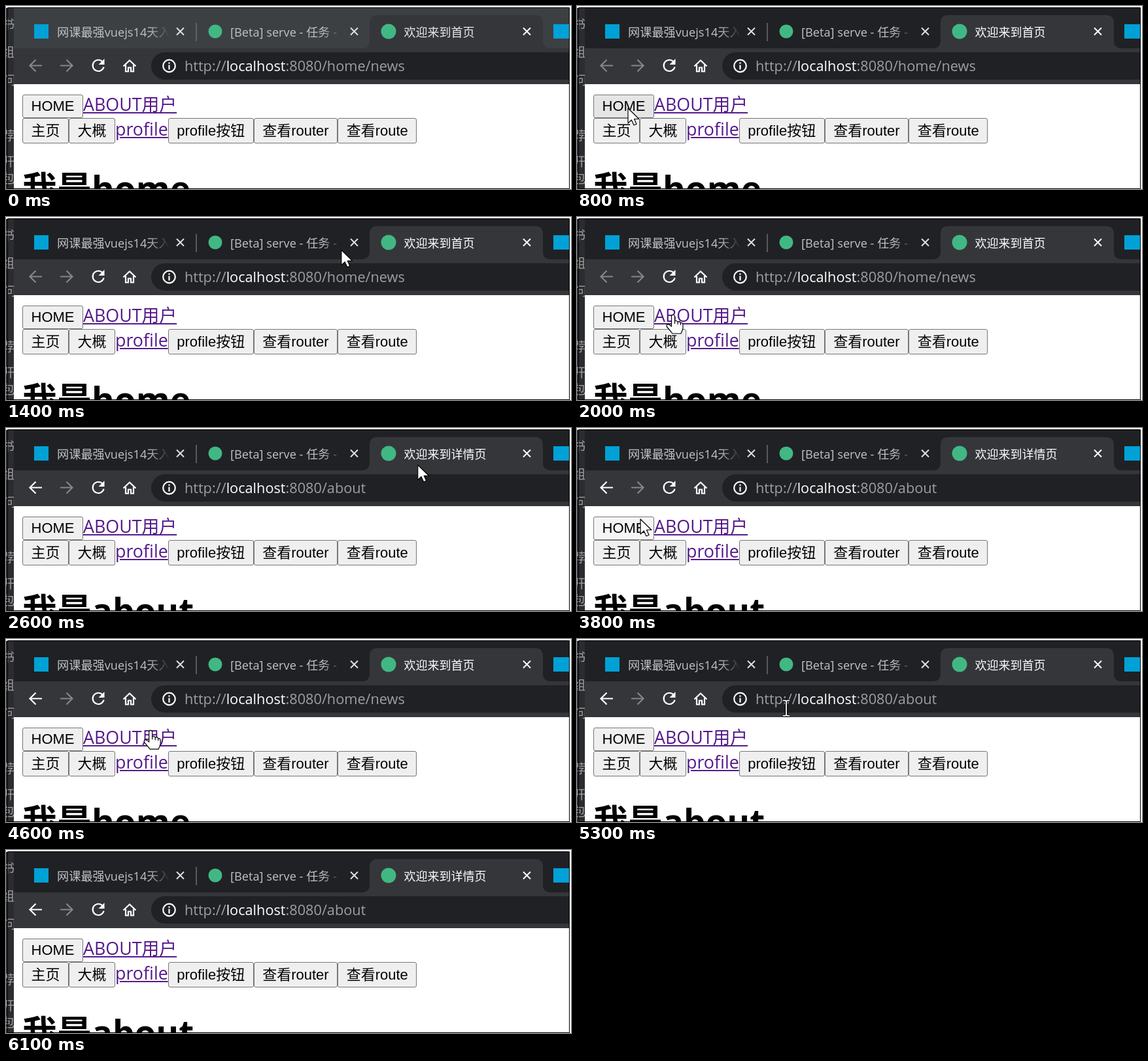
An HTML page for the animation above (6300 ms loop, 864 px wide and 281 px high).

```html
<!DOCTYPE html>
<html lang="zh-CN">
<head>
<meta charset="utf-8">
<title>路由标题</title>
<style>
  html, body { margin: 0; width: 100%; height: 100%; overflow: hidden; background: #fff; }
  svg { display: block; font-family: "Open Sans", "Noto Sans CJK SC", sans-serif; }
  .icon { fill: none; stroke: #fff; stroke-width: 2.2; }
  .disabled { stroke: #85868a; }
  .close { fill: none; stroke: #dee1e6; stroke-width: 2; }
  .active { stroke: #fff; }
  .tab { font-size: 18.2px; }
  .url { font-size: 21.7px; fill: #9aa0a6; }
  .cursor { fill: #fff; stroke: #000; stroke-width: 1.2; stroke-linejoin: round; }
  .page { height: 100%; box-sizing: border-box; padding: 16px 13px; background: #fff; }
  .row { display: flex; align-items: baseline; height: 36px; white-space: nowrap; }
  .row + .row { height: 39px; }
  .row + .row button { padding-top: 1px; }
  a { flex: none; font-size: 26.8px; line-height: 1; color: #551a8b; text-decoration: underline; }
  button {
    flex: none; box-sizing: border-box; height: 100%; margin: 0; padding: 0 12.5px;
    border: 1px solid #767676; border-radius: 3px; color: #000;
    font: 22px/1 "Liberation Sans", "Noto Sans CJK SC", sans-serif;
  }
</style>
</head>
<body>
<svg width="864" height="281" viewBox="0 0 864 281">
  <defs>
    <linearGradient id="fade1" gradientUnits="userSpaceOnUse" x1="218" x2="250">
      <stop stop-color="#bdc1c6"/><stop offset="1" stop-color="#bdc1c6" stop-opacity="0"/>
    </linearGradient>
    <linearGradient id="fade2" href="#fade1" gradientUnits="userSpaceOnUse" x1="483" x2="515"/>
    <path id="cross" d="M-5.5-5.5L5.5 5.5M5.5-5.5L-5.5 5.5"/>
    <path id="caret" fill="none" d="M-5-11Q0-12 0-9Q0-12 5-11M0-9V10M-5 12Q0 13 0 10Q0 13 5 12"/>
  </defs>

  <!-- Window behind -->
  <rect y="3" width="12" height="278" fill="#2b2c2f"/>
  <g fill="#a0a0a0" font-size="19" text-anchor="end">
    <text x="13" y="35">书</text><text x="13" y="78">组</text><text x="15" y="121">问</text>
    <text x="13" y="206">荐</text><text x="13" y="246">开</text><text x="13" y="272">包</text>
  </g>

  <!-- Tab strip -->
  <rect id="strip" x="12" y="3" width="850" height="62"/>
  <path fill="#35363a" d="M544 65Q556 65 556 53V26Q556 14 568 14H809Q821 14 821 26V53Q821 65 833 65H862V120H12V65Z"/>
  <g fill="#00a1d6">
    <rect x="43" y="28" width="22" height="22"/><rect x="837" y="28" width="24" height="22"/>
  </g>
  <g fill="#41b883"><circle cx="320" cy="39" r="10.5"/><circle cx="585" cy="39" r="11.5"/></g>
  <path d="M291 26V54" stroke="#6b6e72" stroke-width="1.5"/>
  <text class="tab" x="78" y="47" fill="url(#fade1)">网课最强vuejs14天入</text>
  <text class="tab" x="343" y="47" fill="url(#fade2)">[Beta] serve - 任务 -</text>
  <text id="title" x="608.5" y="47" font-size="18"></text>
  <use href="#cross" class="close" x="266.5" y="39"/>
  <use href="#cross" class="close" x="532.5" y="39"/>
  <use href="#cross" class="close active" x="796.5" y="39"/>

  <!-- Toolbar -->
  <path id="back" class="icon" d="M55 91.5H37M45.5 82.5L36.5 91.5L45.5 100.5"/>
  <path class="icon disabled" d="M83 91.5H101M92.5 82.5L101.5 91.5L92.5 100.5"/>
  <path class="icon" d="M148 86A8.6 8.6 0 1 0 149.6 93.5"/>
  <path fill="#fff" d="M150.5 81V90H141.5Z"/>
  <path class="icon" d="M179.5 92.5L189 83.5L198.5 92.5M183 90.5V100.5H187V94.5H191V100.5H195V90.5"/>
  <path fill="#202124" d="M862 71H243a21 21 0 0 0 0 42H862Z"/>
  <circle class="icon" cx="249.5" cy="92" r="9.3"/>
  <path class="icon" d="M249.5 90.5V97.5M249.5 86.5V88.8"/>
  <text class="url" x="273" y="100">http://<tspan fill="#fff">localhost</tspan>:8080<tspan id="path"></tspan></text>

  <foreignObject x="12" y="120" width="850" height="161">
    <div class="page">
      <div class="row"><button>HOME</button><a>ABOUT用户</a></div>
      <div class="row">
        <button>主页</button><button>大概</button><a>profile</a>
        <button>profile按钮</button><button>查看router</button><button>查看route</button>
      </div>
    </div>
  </foreignObject>
  <text id="heading" x="25" y="300" font-size="53" font-weight="700"></text>

  <g id="tooltip">
    <rect x="546" y="64" width="330" height="87.5" rx="9" fill="#2b2c2f"/>
    <text x="573" y="101" font-size="19.2" font-weight="700" fill="#dcdde0">欢迎来到首页</text>
    <text x="573" y="127" font-size="19.6" fill="#9aa0a6">localhost:8080</text>
  </g>

  <g id="cursor" class="cursor">
    <path id="arrow" d="M0 0V23L5.3 18L9 26L13 24.3L9.5 16.5H16.8Z"/>
    <path id="hand" d="M-2.5 2Q0-2 2.5 2V10Q5 8 7 11Q10 9.5 11.5 12.5Q15 12 15 16V21Q14 25 12 29H-1Q-5 24-10 18Q-10 13-5.5 15.5L-2.5 18ZM2.5 10V14M7 11V15M11.5 12.5V16"/>
    <g id="beam">
      <use href="#caret" stroke-width="4"/><use href="#caret" stroke="#fff" stroke-width="1.8"/>
    </g>
  </g>

  <path d="M2.5 281V2.5H861.5V281M2 280.5H862" fill="none" stroke="#000"/>
  <rect x="862" width="2" height="281" fill="#fff"/>
</svg>
<script>
const LOOP = 6300, STEP = 100, REST = 100;
const FOCUS = 600, ABOUT_CLICK = 2100, HOME_CLICK = 3800, SECOND_ABOUT_CLICK = 5100;
const PAGE_DELAY = 100, TITLE_DELAY = 400;

const $ = id => document.getElementById(id);
const show = (id, on) => $(id).style.display = on ? '' : 'none';
const between = (t, from, to) => t >= from && t < to;
const clamp = k => Math.max(0, Math.min(1, k));
const easeOut = k => 1 - (1 - k) ** 1.3;
const controls = [...document.querySelectorAll('button, a')];

// Places the pointer visits: arrival time, x, y
const stops = [
  [100, 837, 113], [600, 20, 215], [800, 78, 157], [1600, 619, 25], [2000, 147, 150],
  [2400, 600, 60], [3000, 718, 47], [3400, 30, 151], [3800, 97, 140], [4200, 705, 42],
  [4800, 10, 183], [5100, 140, 140], [5600, 717, 30], [6000, 5, 270]
];

function pointerAt(t) {
  const i = stops.findLastIndex(([arrival]) => arrival <= t);
  const [t0, x0, y0] = stops[i], [t1, x1, y1] = stops[i + 1] ?? stops[i];
  const k = easeOut(clamp((t - t0 - REST) / (t1 - t0 - REST)));
  return { x: x0 + (x1 - x0) * k, y: y0 + (y1 - y0) * k };
}

function isUnder(control, { x, y }) {
  const box = control.getBoundingClientRect();
  return between(x, box.left, box.right) && between(y, box.top, box.bottom);
}

const aboutChosen = t => between(t, ABOUT_CLICK, HOME_CLICK) || t >= SECOND_ABOUT_CLICK;

function render(t) {
  const visible = between(t, 100, 6100);
  const pointer = visible ? pointerAt(t) : { x: -99, y: -99 };
  const about = aboutChosen(t - PAGE_DELAY);
  const focused = t >= FOCUS;

  $('strip').setAttribute('fill', focused ? '#202124' : '#3c4043');
  $('title').setAttribute('fill', focused ? '#fff' : '#e8eaed');
  $('title').textContent = '欢迎来到' + (aboutChosen(t - TITLE_DELAY) ? '详情页' : '首页');
  $('path').textContent = about ? '/about' : '/home/news';
  $('heading').textContent = '我是' + (about ? 'about' : 'home');
  $('back').classList.toggle('disabled', t < ABOUT_CLICK + PAGE_DELAY);
  $('tooltip').style.opacity = Math.min(clamp((t - 2600) / 200), clamp((3400 - t) / 300));

  const target = controls.find(control => isUnder(control, pointer));
  const hoverColor = t === HOME_CLICK ? '#f5f5f5' : '#e5e5e5';
  for (const control of controls) {
    if (control.tagName === 'BUTTON') control.style.background = control === target ? hoverColor : '#efefef';
  }

  const onLink = target?.tagName === 'A';
  const onUrl = pointer.x > 270 && between(pointer.y, 71, 113);
  show('cursor', visible);
  show('hand', onLink);
  show('beam', onUrl);
  show('arrow', !onLink && !onUrl);
  $('cursor').setAttribute('transform', `translate(${pointer.x} ${pointer.y})`);
}

const start = performance.now();
function tick() {
  const t = (performance.now() - start) % LOOP;
  render(Math.floor(t / STEP) * STEP);
  requestAnimationFrame(tick);
}
tick();
</script>
</body>
</html>
```
